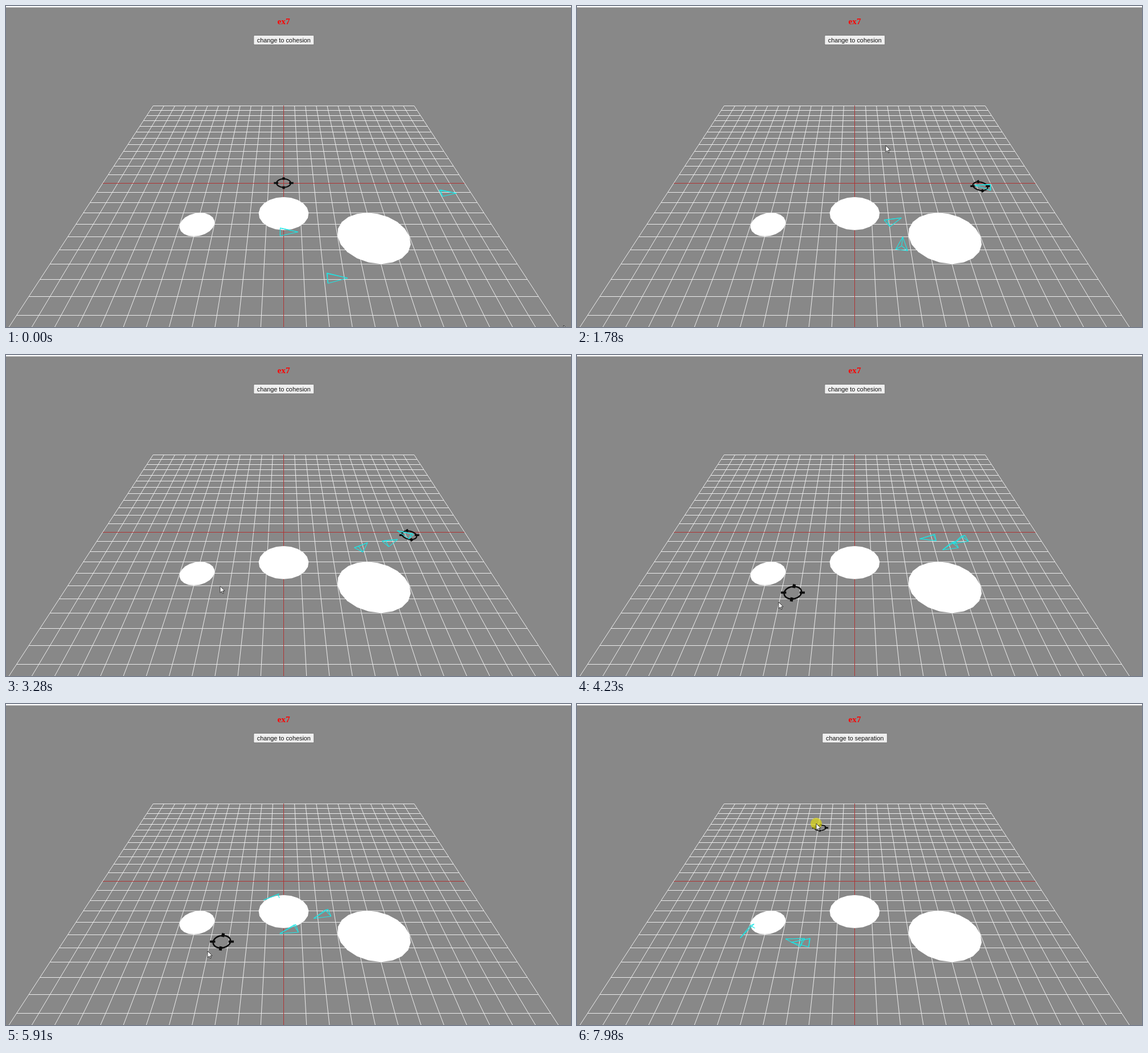
An HTML page with a canvas for the animation above (8000 ms loop, 992 px wide and 564 px high).

```html
<!DOCTYPE html>
<html lang="en">
<head>
<meta charset="utf-8">
<title>Steering agents</title>
<style>
html, body { margin: 0; width: 100%; height: 100%; overflow: hidden; background: #888; }
canvas { display: block; }
</style>
</head>
<body>
<canvas id="stage" width="992" height="564"></canvas>
<script>
const ctx = document.getElementById('stage').getContext('2d');
const LOOP = 8000, STEP = 79.1, LAST = 101;

// Ground plane camera: screen x = CX + UNIT * x / depth, y = HORIZON + DROP / depth
const CX = 487.5, HORIZON = -176.3, DROP = 15107, DIST = 31, UNIT = 820.2, HALF = 12;

const project = (x, z, up = 0) => {
  const d = DIST - z;
  return [CX + UNIT * x / d, HORIZON + (DROP - up * UNIT) / d];
};
const ground = ([sx, sy]) => {
  const d = DROP / (sy - HORIZON);
  return [(sx - CX) * d / UNIT, DIST - d];
};

// Discs on the ground: x, z, radius
const discs = [[0, 3, 1.5], [5, 5, 2], [-5, 4, 1]];

// Screen waypoints, all agents passing theirs at the same steps
const passing = [0, 23, 33, 42, 46, 54, 75, 92, LAST];
const agents = [
  [[777, 329], [712, 317], [706, 318], [699, 314], [694, 314], [671, 327], [553, 372], [423, 418], [392, 419]],
  [[497, 397], [557, 377], [617, 352], [677, 328], [683, 327], [653, 338], [495, 399], [396, 418], [381, 416]],
  [[582, 478], [571, 417], [590, 362], [627, 336], [632, 328], [615, 322], [466, 342], [344, 371], [299, 402]]
];

// Pointer stops: step, x, y
const stops = [
  [0, 979, 561], [7, 701, 309], [20, 542, 245], [36, 542, 245], [43, 372, 410],
  [48, 354, 434], [78, 354, 434], [92, 505, 68], [95, 500, 61], [99, 420, 210], [LAST, 420, 210]
];
const groundClicks = [7, 43, 100], TOGGLE = 94;

const lerp = (a, b, u) => a + (b - a) * u;
const ease = u => u * u * u * (10 + u * (6 * u - 15));

function segment(times, s) {
  let i = 0;
  while (i < times.length - 2 && s >= times[i + 1]) i++;
  return [i, (s - times[i]) / (times[i + 1] - times[i])];
}

function pointerAt(s) {
  const [i, u] = segment(stops.map(k => k[0]), s);
  return [1, 2].map(n => lerp(stops[i][n], stops[i + 1][n], ease(u)));
}

// Cubic through the waypoints, starting from rest
function agentAt(way, s) {
  const [i, u] = segment(passing, s);
  const span = passing[i + 1] - passing[i], u2 = u * u, u3 = u2 * u;
  const slope = (k, n) => {
    if (!k) return 0;
    const q = Math.min(k + 1, way.length - 1);
    return (way[q][n] - way[k - 1][n]) / (passing[q] - passing[k - 1]) * span;
  };
  return [0, 1].map(n => (2 * u3 - 3 * u2 + 1) * way[i][n] + (u3 - 2 * u2 + u) * slope(i, n)
    + (3 * u2 - 2 * u3) * way[i + 1][n] + (u3 - u2) * slope(i + 1, n));
}

// Agents face the way they move, after turning from +x at the start
function headingAt(way, s) {
  const [x0, z0] = ground(agentAt(way, Math.max(s - 1, 0)));
  const [x1, z1] = ground(agentAt(way, Math.min(s + 1, LAST)));
  return Math.atan2(z1 - z0, x1 - x0) * Math.min(1, s / 8);
}

function path(points, close) {
  ctx.beginPath();
  points.forEach(p => ctx.lineTo(p[0], p[1]));
  if (close) ctx.closePath();
}

function line(a, b) {
  path([a, b]);
  ctx.stroke();
}

function ring(x, z, r, sides) {
  path(Array.from({ length: sides }, (_, i) => {
    const a = i / sides * Math.PI * 2;
    return project(x + r * Math.sin(a), z + r * Math.cos(a));
  }), true);
}

function row(z) {
  const [x0, y] = project(-HALF, z), [x1] = project(HALF, z);
  const py = Math.floor(y + 0.45) + 0.5;
  line([x0, py], [x1, py]);
}

function column(x) {
  line(project(x, -HALF), project(x, HALF));
}

function drawGrid() {
  ctx.lineWidth = 1;
  ctx.strokeStyle = '#ececec';
  for (let i = -HALF; i <= HALF; i++) {
    if (i) { row(i); column(i); }
  }
  ctx.strokeStyle = '#b03434';
  row(0);
  column(0);
}

function drawDiscs() {
  ctx.fillStyle = '#fff';
  for (const [x, z, r] of discs) {
    ring(x, z, r, 20);
    ctx.fill();
  }
}

// The crosshair lands slightly below and right of the last ground click
function drawTarget(step) {
  const click = groundClicks.filter(k => k <= step).pop();
  let x = 0, z = 0;
  if (click !== undefined) {
    const [px, py] = pointerAt(click);
    [x, z] = ground([px + 7, py + 7.5]);
  }
  const size = (DIST - 5) / (DIST - z);
  const at = (r, a) => project(x + r * Math.cos(a), z + r * Math.sin(a));
  ctx.strokeStyle = '#0c0c0c';
  ctx.lineWidth = 2.5 * size;
  ring(x, z, 0.47, 32);
  ctx.stroke();
  for (let i = 0; i < 4; i++) {
    const a = i * Math.PI / 2;
    ctx.lineWidth = (i % 2 ? 5 : 3.8) * size;
    line(at(0.36, a), at(0.65, a));
  }
}

// A three-sided pyramid lying on the ground
function drawAgent(way, step) {
  const [x, z] = ground(agentAt(way, step));
  const heading = headingAt(way, step);
  const c = Math.cos(heading), s = Math.sin(heading);
  const place = (ahead, side) => [x + ahead * c - side * s, z + ahead * s + side * c];
  const [back, front] = [place(-0.5, -0.32), place(-0.5, 0.32)].sort((a, b) => a[1] - b[1]);
  const tip = project(...place(0.5, 0)), top = project(...place(-0.5, 0), 0.22);
  const far = project(...back), near = project(...front);
  const covered = discs.some(([dx, dz, r]) => Math.hypot(front[0] - dx, front[1] - dz) < r);
  ctx.strokeStyle = '#1ce6e6';
  ctx.lineWidth = 1.1;
  line(tip, far);
  line(tip, top);
  line(far, top);
  if (covered) {
    line(far, [lerp(far[0], near[0], 0.6), lerp(far[1], near[1], 0.6)]);
  } else {
    line(far, near);
    line(tip, near);
    line(near, top);
  }
}

function drawHeader(step) {
  ctx.fillStyle = '#fff';
  ctx.fillRect(0, 0, 992, 2.4);
  ctx.textAlign = 'center';
  ctx.fillStyle = '#f00';
  ctx.font = 'bold 15.26px "Liberation Serif", serif';
  ctx.fillText('ex7', CX, 31.5);

  const swapped = step >= TOGGLE, width = swapped ? 114 : 106;
  ctx.fillStyle = '#efefef';
  ctx.strokeStyle = '#767676';
  ctx.lineWidth = 1;
  ctx.beginPath();
  ctx.roundRect(CX + 0.3 - width / 2, 51.5, width, 16.6, 1.5);
  ctx.fill();
  ctx.stroke();
  ctx.fillStyle = '#111';
  ctx.font = '10.87px "Liberation Sans", Arial, sans-serif';
  ctx.fillText(swapped ? 'change to separation' : 'change to cohesion', CX + 0.3, 63.6);
}

function drawPointer(step) {
  const [x, y] = pointerAt(step);
  if ([...groundClicks, TOGGLE].some(k => step >= k && step < k + 2)) {
    ctx.fillStyle = 'rgba(222, 216, 20, 0.7)';
    ctx.beginPath();
    ctx.arc(x, y, 10, 0, Math.PI * 2);
    ctx.fill();
  }
  const arrow = [[0, 0], [0, 11.5], [2.7, 9], [4.5, 13], [6.2, 12.2], [4.5, 8.4], [8, 8.2]];
  path(arrow.map(p => [x + p[0], y + p[1]]), true);
  ctx.fillStyle = '#fff';
  ctx.strokeStyle = '#222';
  ctx.lineWidth = 0.9;
  ctx.fill();
  ctx.stroke();
}

function draw() {
  const t = performance.now() % LOOP;
  const step = Math.min(LAST, Math.max(0, 1 + Math.floor((t - 30) / STEP)));
  ctx.fillStyle = '#888';
  ctx.fillRect(0, 0, 992, 564);
  drawGrid();
  drawDiscs();
  drawTarget(step);
  agents.forEach(way => drawAgent(way, step));
  drawHeader(step);
  drawPointer(step);
  requestAnimationFrame(draw);
}
draw();
</script>
</body>
</html>
```
